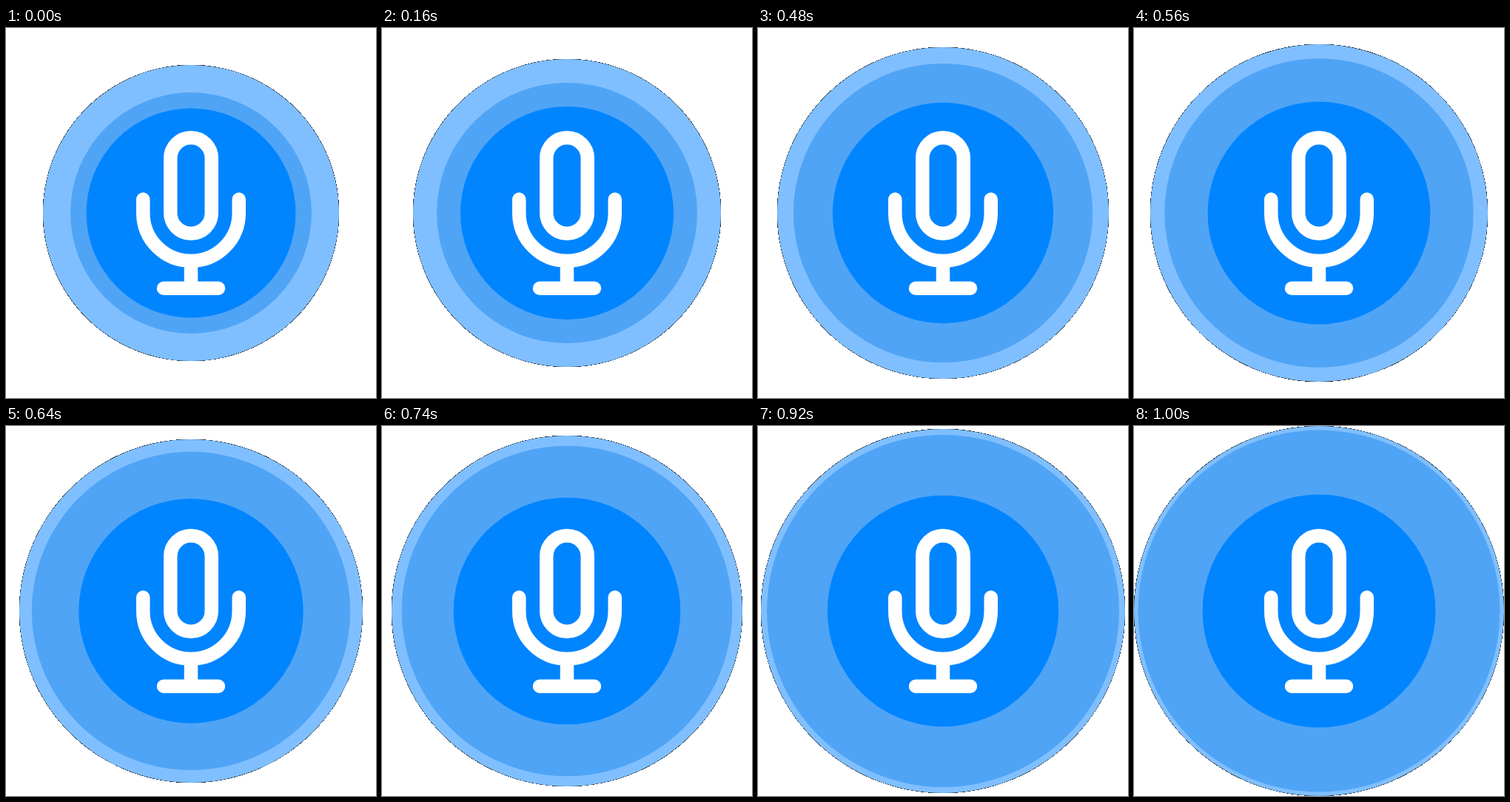
An HTML page for the animation above (1020 ms loop, 500 px wide and 500 px high).

```html
<!DOCTYPE html>
<html lang="en">
<head>
<meta charset="utf-8">
<title>Microphone pulse</title>
<style>
  html, body { margin: 0; width: 100%; height: 100%; overflow: hidden; background: #fff; }
  svg { display: block; width: 100vw; height: 100vh; }
</style>
</head>
<body>
<svg viewBox="0 0 500 500">
  <g transform="translate(250 250)">
    <!-- Hard-edged black disc: the outer ring's soft edge fades into it -->
    <circle id="rim" fill="#000" shape-rendering="crispEdges"/>
    <circle id="outer" fill="#80bfff"/>
    <circle id="middle" fill="#50a4f5"/>
    <circle id="inner" fill="#0085ff"/>
    <g transform="scale(9.25)" fill="none" stroke="#fff" stroke-width="2" stroke-linecap="round">
      <rect x="-3" y="-11" width="6" height="14" rx="3"/>
      <path d="M-7 -2V0A7 7 0 0 0 7 0V-2M0 7V11M-4 11H4"/>
    </g>
  </g>
</svg>
<script>
  const LOOP = 1020, STEP = 20, GROW = 1000;
  // Radius at the start and the end of the growth
  const rings = {
    rim: [200.4, 250.4],
    outer: [200, 250],
    middle: [163, 244.5],
    inner: [141.5, 157.5]
  };
  const parts = Object.entries(rings).map(([id, range]) => [document.getElementById(id), range]);

  function draw(ms) {
    const p = Math.floor((ms % LOOP) / STEP) * STEP / GROW;
    for (const [el, [from, to]] of parts) el.setAttribute('r', from + (to - from) * p);
  }

  const start = performance.now();
  function tick() {
    draw(performance.now() - start);
    requestAnimationFrame(tick);
  }
  draw(0);
  requestAnimationFrame(tick);
</script>
</body>
</html>
```
